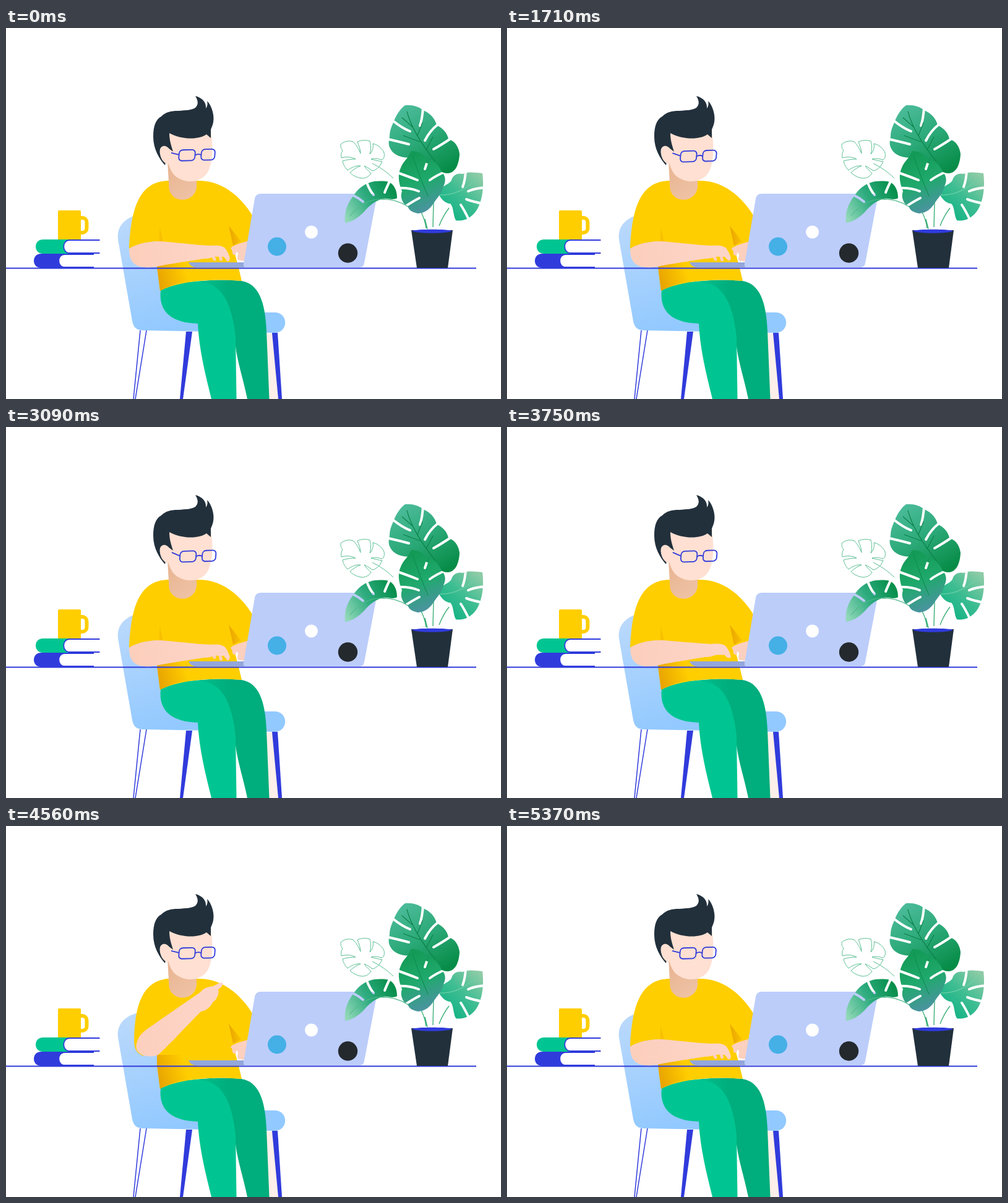
These frames come from a looping animation (800x600 px, 5400 ms). An HTML page with a canvas:

```html
<!DOCTYPE html>
<html lang="en">
<head>
<meta charset="utf-8">
<title>At the desk</title>
<style>
html, body { margin: 0; width: 100%; height: 100%; overflow: hidden; background: #fff; }
canvas { display: block; width: 800px; height: 600px; }
</style>
</head>
<body>
<canvas id="stage" width="800" height="600"></canvas>
<script>
const stage = document.getElementById('stage').getContext('2d');
let ctx = stage;
const LOOP = 5400, STEP = 30;
const BLUE = '#303bdc', DARK = '#22303c', YELLOW = '#ffce00', SKIN = '#fcd0bf', FACE = '#ffe0d2', GREEN = '#00c592';

const clamp = x => Math.max(0, Math.min(1, x));
const ease = x => x < .5 ? 4 * x ** 3 : 1 - (2 - 2 * x) ** 3 / 2;
const soft = x => x * x * (3 - 2 * x);
const span = (t, a, b) => clamp((t - a) / (b - a));

function grad(x0, y0, x1, y1, ...colors) {
  const g = ctx.createLinearGradient(x0, y0, x1, y1);
  colors.forEach((c, i) => g.addColorStop(i / (colors.length - 1), c));
  return g;
}
function fill(d, color) {
  ctx.fillStyle = color;
  ctx.fill(new Path2D(d));
}
function line(d, color, width) {
  ctx.strokeStyle = color;
  ctx.lineWidth = width;
  ctx.stroke(new Path2D(d));
}
function disc(x, y, r, color) {
  ctx.fillStyle = color;
  ctx.beginPath();
  ctx.arc(x, y, r, 0, 7);
  ctx.fill();
}
function layer() {
  const c = document.createElement('canvas');
  c.width = 800;
  c.height = 600;
  return c;
}
// blend two paths that share the same commands
function blend(a, b, k) {
  const to = b.match(/-?[\d.]+/g);
  let i = 0;
  return a.replace(/-?[\d.]+/g, n => (+n + (to[i++] - n) * k).toFixed(2));
}

const SLEEVE_DOWN = 'M262 247C216 248 202 290 199 357C215 347 235 345 250 345L262 320Z';
const SLEEVE_UP = 'M262 247C222 250 207 288 207 350C208 360 210 367 222 372L262 300Z';
const ARM_DOWN = 'M199 357C215 347 235 345 250 345C285 348 310 351 330 352C342 351 350 352 354 356' +
  'C358 361 361 368 362 373C360 377 355 375 352 370C346 370 338 369 333 371C328 373 324 373 320 373' +
  'C290 378 260 382 243 386C215 390 199 385 199 357Z';
const ARM_UP = 'M211 352C214 340 220 334 230 327C265 303 290 285 314 269C318 263 326 260 335 259' +
  'C341 256 346 253 349 253C352 256 348 262 343 264C345 272 340 282 334 285C330 294 322 299 315 300' +
  'C290 325 268 350 246 370C234 376 206 372 211 352Z';

function chair() {
  fill('M181 342C179 322 190 309 210 303H260V460H434C457 460 457 493 434 493L222 489C211 489 206 484 204 474Z',
    grad(200, 304, 250, 490, '#bbd9fc', '#92c9ff'));
  line('M217 489L206 600M227 489L209 600', BLUE, 1.5);
  fill('M291 491H301L286 600H281Z', BLUE);
  fill('M418 494H431L440 600H420Z', '#fdefe9');
  fill('M430 493H439L446 600H440Z', BLUE);
}

function trousers() {
  fill('M255 423C280 408 350 405 380 409C408 413 419 442 421 490L425.5 600H390C384 570 374 540 371 515L320 430Z',
    grad(300, 430, 360, 425, GREEN, '#00ad7c'));
  fill('M250 424C268 412 300 408 322 412C350 418 366 448 371 500L372.5 600H332C322 560 312 520 310 478C268 477 246 459 250 424Z', GREEN);
}

function shirt(k) {
  fill('M258 247H312C347 247 378 269 400 306L390 352L367 354L376 388L381 409C340 405 280 408 249 425L244 386L248 300Z', YELLOW);
  fill('M244 370L300 370L300 408C280 411 264 417 249 425L244 386Z',
    grad(246, 410, 292, 395, '#e8a300', YELLOW));
  fill('M360 320L380 345L367 352Z', grad(362, 340, 380, 338, '#eaa600', '#fbc400'));
  fill(blend(SLEEVE_DOWN, SLEEVE_UP, k), YELLOW);
  fill('M248.5 322L247.5 346H254Z', '#f8c000');
}

function head() {
  fill('M261 215L263.5 260C268 284 304 284 308 258V240Z', grad(266, 235, 298, 278, '#e9b795', '#efc3a6'));
  fill('M258 165H331C335 192 334 214 328 229C318 253 288 252 273 239C265 232 260 215 258 195Z', FACE);
  fill('M257 222C248 212 238 196 238 176C238 158 242 148 251 143C258 136 266 134 278 134C291 133 300 133 306 129' +
    'C311 124 311 118 306 110C318 113 324 121 323 130C326 126 326 122 325 118C333 126 337 142 335 152' +
    'C334 159 331 162 331 166L331 178L324 172C312 181 284 181 264 170C264 182 267 190 270 200' +
    'L262 194C258 190 251 190 249 196C247 204 252 213 258 217Z', DARK);
  fill('M264 197C261 189 250 188 249 198C248 208 253 218 262 221Z', FACE);
}

function glasses(k) {
  const dx = 1.6 * k, dy = 3.6 * k;
  ctx.save();
  ctx.translate(dx, dy + .8);
  ctx.strokeStyle = BLUE;
  ctx.lineWidth = 1.8;
  ctx.save();
  ctx.transform(1, -.03, -.08, 1, 16.4, 9);
  for (const [x, w] of [[279.5, 26], [315.5, 22]]) {
    ctx.beginPath();
    ctx.roundRect(x, 196, w, 17.5, 5.5);
    ctx.stroke();
  }
  ctx.restore();
  line('M306 205Q310 202 315 204.5', BLUE, 1.8);
  line(`M${267 - dx * .4} ${201 - dy * .7}L279 204`, BLUE, 1.8);
  ctx.restore();
}

function books() {
  fill('M84 297Q84 295 86 295H119Q121 295 121 297V342H84Z', YELLOW);
  ctx.strokeStyle = YELLOW;
  ctx.lineWidth = 6;
  ctx.beginPath();
  ctx.roundRect(112, 307, 18.4, 24, 7);
  ctx.stroke();
  fill('M60 342H105V365H60C44 365 44 342 60 342Z', GREEN);
  fill('M57 365H98V388H57C41 388 41 365 57 365Z', BLUE);
  for (const [x, y, end] of [[103, 343, 151.5], [95, 366, 142]]) {
    const d = `M${end} ${y}H${x}C${x - 13} ${y} ${x - 13} ${y + 21} ${x} ${y + 21}H${end}`;
    fill(d, '#fff');
    line(d, BLUE, 1.8);
  }
}

function typing(t, k) {
  const tap = n => 1.8 * Math.max(0, Math.sin(t / 300 * Math.PI * 2 + n));
  ctx.save();
  ctx.lineCap = 'round';
  ctx.save();
  ctx.translate(0, -tap(2) * .7);
  fill('M363 357C370 351 380 349 390 346L388 378C382 378 376 378 374 375C374 370 376 367 374 364C370 363 365 362 363 357Z', SKIN);
  line('M368 357L369 365', SKIN, 6);
  ctx.restore();
  if (k < .002) {
    line(`M332 365L337 ${374 - tap(0)}`, SKIN, 5);
    line(`M344 362L347.5 ${375.5 - tap(2.2)}`, SKIN, 5);
    line(`M352 360L358.5 ${375 - tap(4.2)}`, SKIN, 5);
  }
  ctx.restore();
}

function arm(k) {
  const lift = Math.min(1, k / .75), reach = clamp((k - .75) / .25);
  ctx.save();
  ctx.translate(232 + 4 * reach, 350 - 10 * reach);
  ctx.rotate(-reach * Math.PI / 9);
  ctx.translate(-232, -350);
  fill(blend(ARM_DOWN, ARM_UP, lift), grad(210, 360, 345, 330, '#fccfbd', '#fdd5c8'));
  ctx.restore();
}

function laptop() {
  fill('M412 268H590C597 268 600 272 598 280L579 380C578 386 575 387 570 387H387Q383 387 384 381L402 276C403 271 406 268 412 268Z', '#bccdfa');
  disc(493.5, 330, 10.5, '#fff');
  disc(438, 353.5, 15, '#45b0e6');
  disc(552.5, 364, 15.7, '#24292e');
}

// a leaf blade with slits cut out of it, then its vein
function leaf(shape, slits, color, vein, veinColor) {
  const c = layer(), main = ctx;
  ctx = c.getContext('2d');
  fill(shape, color);
  ctx.globalCompositeOperation = 'destination-out';
  ctx.lineCap = 'round';
  line(slits, '#000', 4);
  ctx.globalCompositeOperation = 'source-over';
  line(vein, veinColor, 1.1);
  ctx = main;
  ctx.drawImage(c, 0, 0);
}

function plant() {
  line('M670 296Q677 309 679 324M691 282L690 322M716 291Q706 304 700 320M677 309L681 325', '#3bb078', 1.4);
  fill('M655 327H722L714 388H664Z', DARK);
  fill('M656 328C664 325 713 325 721 328C715 333 662 333 656 328Z', BLUE);

  line('M541 188C548 182 556 182 561 184C567 190 570 196 573 203C573 196 570 190 568 184C575 181 583 181 588 183' +
    'C590 190 590 196 588 204C593 199 594 192 593 187C602 189 609 196 611 202C612 207 611 211 608 213' +
    'C602 212 597 210 590 212C596 214 602 215 608 216C604 225 598 230 592 231C588 228 584 225 579 223' +
    'C583 229 587 232 590 235C586 241 581 243 575 243C567 242 560 238 556 234C561 229 567 225 573 223' +
    'C565 222 558 226 552 230C547 225 545 220 544 215C551 213 558 212 565 212C557 208 550 208 542 210' +
    'C541 205 542 201 544 198C541 195 541 192 541 188ZM592 219Q612 229 626 243', '#58bd90', 1);

  leaf('M645 125C657 124 667 127 674 133C686 138 693 146 696 157C708 163 714 172 715 180C726 182 732 194 733 204' +
    'C732 220 727 234 714 235C703 235 697 228 690 222L655 210C640 210 626 206 621 195C617 187 619 182 620 175' +
    'C620 165 624 158 627 150C632 138 638 130 645 125Z',
    'M669 158Q673 146 674 128M677 182Q685 166 698 156M691 196Q702 190 720 178M653 167Q640 162 624 149M651 188Q636 184 614 179',
    grad(640, 125, 705, 235, '#4dbc9b', '#2ba978', '#078c47'),
    'M648 135Q657 170 694 216M657 160L640 145M669 184L642 174M665 174L673 153M679 197L690 176', '#0b8048');

  leaf('M548 315C546 298 552 283 561 272C568 260 580 252 588 250C596 247 610 247 619 249C627 253 632 262 632 275' +
    'C624 280 614 273 606 277C592 282 585 290 578 298C568 308 558 314 548 315Z',
    'M577 281Q570 275 560 270M594 270Q588 263 583 250M612 266Q615 258 621 246',
    grad(548, 305, 625, 260, '#91d8b8', '#2fac80', '#078f4c'), 'M556 304Q580 274 612 277', '#53b98b');
  line('M606 277Q630 276 650 289', '#53b98b', 1.2);

  leaf('M698 266C704 254 716 254 720 246C722 238 730 234 738 236C748 232 760 234 770 235C772 250 771 268 767 280' +
    'C763 294 756 302 748 307C740 312 732 312 727 311C722 302 724 290 718 284C710 284 702 276 698 266Z',
    'M738 257Q742 247 743 230M747 264Q758 259 775 258M744 277Q755 281 770 284M735 286Q741 295 748 310',
    grad(765, 240, 710, 300, '#8ccba6', '#3fbd92', '#12b384'), 'M700 270Q732 272 764 242', '#6ccfa6');

  leaf('M655 199C668 199 674 204 679 210C690 212 700 222 704 232C711 240 711 248 707 256C704 268 696 276 692 282' +
    'C686 292 678 299 666 300C658 298 652 296 650 290L643 284C638 276 638 270 640 264C634 250 633 236 638 226' +
    'C642 216 648 212 650 208Z',
    'M677 228Q680 218 685 206M685 246Q696 238 711 232M665 246Q650 240 630 233M667 264Q652 258 633 259M668 275Q658 280 643 290',
    grad(655, 205, 690, 292, '#139a56', '#1fa96c', '#4b93a0'), 'M657 206Q668 240 682 272', '#0f8e50');
}

const foliage = layer();
ctx = foliage.getContext('2d');
plant();
ctx = stage;

function draw(t) {
  const k = ease(span(t, 3680, 4200)) - ease(span(t, 4340, 4894));
  const slip = soft(span(t, 1000, 2400)) - soft(span(t, 4200, 4360));
  ctx.fillStyle = '#fff';
  ctx.fillRect(0, 0, 800, 600);
  chair();
  trousers();
  shirt(Math.min(1, k / .75));
  head();
  glasses(slip);
  books();
  line('M0 388.5H760', BLUE, 2);
  fill('M295 379H388V387.5H310C302 387 298 385 295 379Z', '#94a7db');
  typing(t, k);
  arm(k);
  laptop();
  ctx.drawImage(foliage, 0, 0);
}

const start = performance.now();
function frame() {
  const t = (performance.now() - start) % LOOP;
  draw(Math.floor(t / STEP) * STEP);
  requestAnimationFrame(frame);
}
frame();
</script>
</body>
</html>
```
